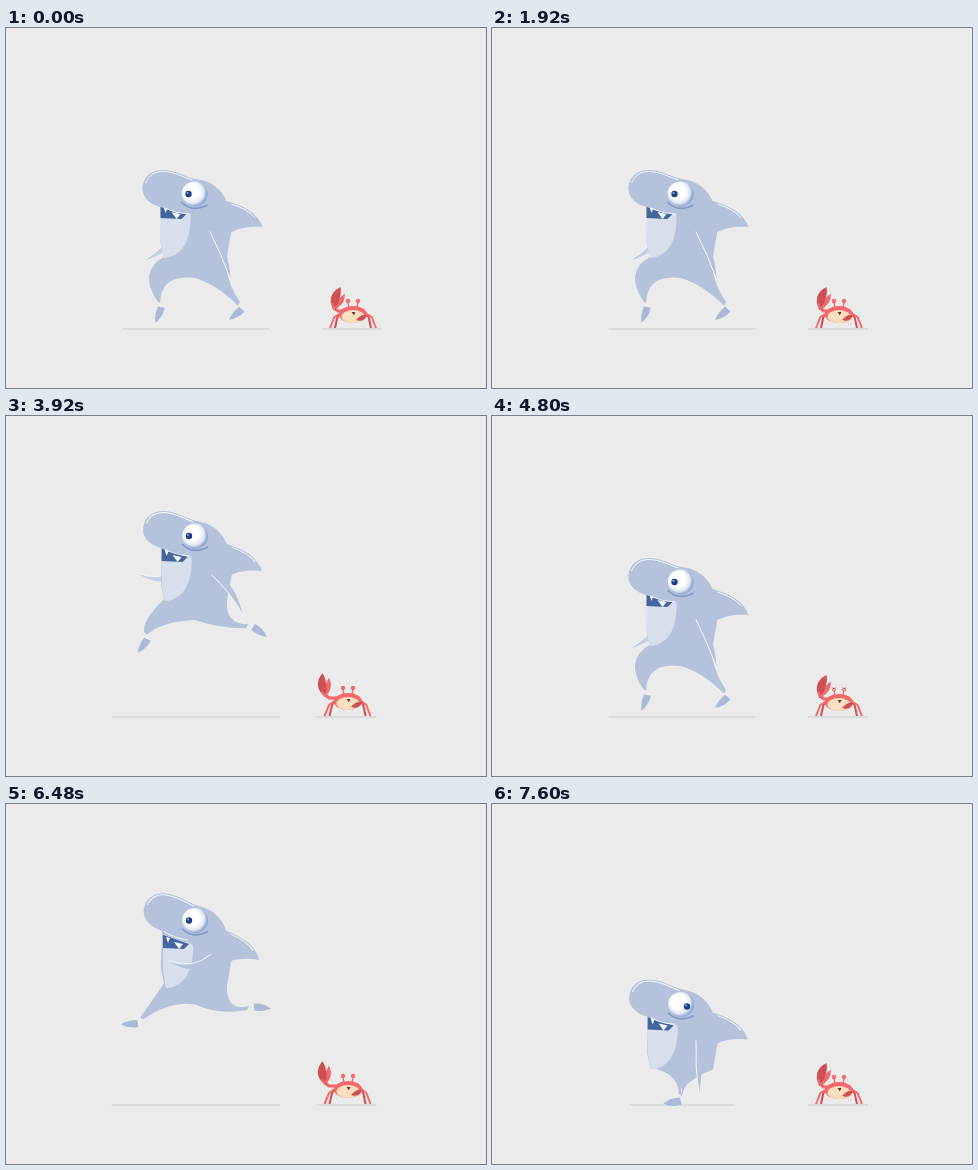
Write an HTML page with a canvas that moves like this. It is 480 px wide and 360 px high and loops after 7.68 s.

```html
<!DOCTYPE html>
<html lang="en">
<head>
<meta charset="utf-8">
<title>Shark and crab</title>
<style>
html, body { margin: 0; width: 100%; height: 100%; overflow: hidden; background: #ebebeb; }
canvas { display: block; }
</style>
</head>
<body>
<canvas id="stage" width="480" height="360"></canvas>
<script>
const ctx = document.getElementById('stage').getContext('2d');
const BLUE = '#b4c2dc', PALE = '#d7dfed', WHITE = '#f5f8fd', NAVY = '#45659f';
const RED = '#f3696b', DARK_RED = '#cf5052', CREAM = '#f9dfc0';
const LOOP = 7680, STEP = 80, GROUND = 301;

const lerp = (a, b, k) => a + (b - a) * k;
const mix = (a, b, k) => a.map((v, i) => lerp(v, b[i], k));
const polar = ([x, y], len, angle) => [x + len * Math.sin(angle), y + len * Math.cos(angle)];

// Pose at time t from [time, numbers] keys
function tween(keys, t, ease = k => k) {
  const next = keys.findIndex(key => key[0] > t);
  if (next < 0) return keys[keys.length - 1][1];
  const [t0, a] = keys[next - 1], [t1, b] = keys[next];
  return mix(a, b, ease((t - t0) / (t1 - t0)));
}

function shape(d, color) {
  ctx.fillStyle = color;
  ctx.fill(new Path2D(d));
}
function curve(d, color, width = 1) {
  ctx.strokeStyle = color;
  ctx.lineWidth = width;
  ctx.stroke(new Path2D(d));
}
function oval(color, x, y, rx, ry = rx) {
  ctx.beginPath();
  ctx.ellipse(x, y, rx, ry, 0, 0, 7);
  ctx.fillStyle = color;
  ctx.fill();
}
function within(x, y, angle, draw) {
  ctx.save();
  ctx.translate(x, y);
  ctx.rotate(angle);
  draw();
  ctx.restore();
}
const ground = (x0, x1) => curve(`M${x0},${GROUND}H${x1}`, '#c9ccd3', 1.1);

// Stride keys, in steps: eye x, y, head tilt, pupil shift,
// then heel x, y, toe angle and knee x, y for the front and the back leg
const stride = [
  [0, [188.5, 166, 0, -6, 155.5, 279, 1.95, 132, 244, 236, 281, 2.45, 219, 252]],
  [1, [189, 120, .03, -6, 141.5, 223, 2.2, 135, 206, 247, 211, .63, 219, 208]],
  [3, [189, 116.5, .1, -6, 132, 219.5, 3.1, 148, 194, 248, 203, .1, 220, 208]],
  [5, [189, 200.5, .03, 6, 188, 297, 3, 187, 269, 189, 297, 3, 192, 277]]
];

function foot(x, y, angle) {
  within(x, y, angle, () => {
    shape('M-1,-3.5Q10,-5 17,0Q9,4 0,3.5Z', '#a9b9d7');
    curve('M-1,-3.5L0,3.5', WHITE);
  });
}

function torso(x, y, front, frontKnee, back, backKnee) {
  const crotch = [x, y + 84];
  const ankle = (heel, knee) =>
    mix(heel, knee, 6 / Math.hypot(knee[0] - heel[0], knee[1] - heel[1]));
  const [fx, fy] = ankle(front, frontKnee), [bx, by] = ankle(back, backKnee);
  const [ix, iy] = mix(backKnee, crotch, .25);
  shape(`M${x - 33},${y + 10}L${x - 34},${y + 48}L${x - 31},${y + 63}
    Q${frontKnee} ${fx - 1},${fy - 1}L${fx + 2},${fy + 1}
    Q${mix(frontKnee, crotch, .4)} ${crotch}
    Q${ix},${iy + 5} ${bx - 1},${by + 2}L${bx + 1},${by - 2}
    Q${backKnee} ${x + 32},${y + 65}L${x + 37},${y + 37}L${x},${y}Z`, BLUE);
}

function face() {
  shape('M-34,12L-4,20C-3,46 -12,63 -31,64L-34,48Z', PALE);
  shape('M-34,11L-8,20L-13,25L-34,24Z', NAVY);
  shape('M-31,13L-27,14L-29,19ZM-23,18L-14,20L-18,25Z', WHITE);
}

function head() {
  shape(`M-34,13C-46,10 -53,2 -52,-7C-51,-18 -42,-24 -32,-24C-18,-24 -8,-16 4,-14.5
    C16,-13 27,-5 32,7C50,12 63,19 68,33C58,32 46,33 37,38L10,36L-4,20
    C-14,20 -24,17 -34,13Z`, BLUE);
  curve('M-49,-11C-46,-19 -39,-22.5 -32,-22.5C-20,-22.5 -12,-17 -2,-14', WHITE);
  curve('M37,10Q53,15 61,24', WHITE);
  curve('M-30,14Q-18,20 -5,20', WHITE);
}

function eye(look) {
  curve('M-13,8Q-3,19 13,11', '#8298c5', 1.6);
  const shade = ctx.createRadialGradient(-4, -4, 4, -1, -1, 14);
  shade.addColorStop(.35, '#fff');
  shade.addColorStop(.7, '#e3eaf4');
  shade.addColorStop(1, '#8299c9');
  oval(shade, 0, 0, 13, 12.5);
  oval('#1f3f80', look, look / 6 + 1, 3.2);
  oval('#8fb0e4', look - 1, look / 6, 1);
}

// swing runs from -1 (forward) to 1 (back); the elbow always folds forward
function arm(shoulder, swing, color) {
  const upper = swing, lower = upper - Math.abs(swing) + .4 * swing;
  const elbow = polar(shoulder, 27, upper), hand = polar(elbow, 27, lower);
  const side = (p, d, angle) => polar(p, d, angle - Math.PI / 2);
  const edge = `M${side(shoulder, 3, upper)}Q${side(elbow, 4, (upper + lower) / 2)} ${hand}`;
  shape(`${edge}Q${side(elbow, -4, (upper + lower) / 2)} ${side(shoulder, -4, upper)}Z`, color);
  curve(edge, WHITE);
}

function shark(step) {
  const [x, y, tilt, look, fx, fy, fa, fkx, fky, bx, by, ba, bkx, bky] = tween(stride, step % 6);
  const swing = Math.cos((step - 2) * Math.PI / 6);
  const reach = 84.5 - ((y - 116) / 15) ** 2;
  ground(190 - reach, 190 + reach);
  if (swing > .3) arm([x - 13, y + 33], -swing, '#c3cfe4');
  foot(fx, fy, fa);
  foot(bx, by, ba);
  torso(x, y, [fx, fy], [fkx, fky], [bx, by], [bkx, bky]);
  within(x + tilt * 20, y + tilt * 35, 0, face);
  within(x, y, tilt, head);
  within(x, y, 0, () => eye(look));
  arm([x + 18, y + 36], swing, BLUE);
}

// ground start, body x, y, claw x, y, claw angle
const rest = [316, 347, 287, 328, 280, .3];
const grab = [308, 337, 286.5, 311, 277, -1.25];
const raise = [310.5, 342, 286, 319, 279, -.12];
const crabKeys = [[0, rest], [560, rest], [880, grab], [1040, grab],
  [1280, raise], [1600, raise], [1920, rest], [2560, rest]];

function claw() {
  shape('M0,2C6,-3 9,-9 6,-17Q3,-11 -1,-8Z', RED);
  shape('M2,2C-8,-3 -8,-15 0,-22C4,-15 2,-9 2,2Z', DARK_RED);
  curve('M-3,-4L0,1L3,-4', RED, 2.2);
}

function crab(t) {
  const [x0, x, y, cx, cy, angle] = tween(crabKeys, t, k => k * k * (3 - 2 * k));
  const looking = Math.abs(t - 680) < 440 || Math.abs(t - 2240) < 160;
  ground(x0, x0 + 60);
  for (const side of [-1, 1]) {
    for (const spread of [18, 23]) {
      const hip = x + side * 12, toe = x0 + 31 + side * spread;
      curve(`M${hip},${y - 2}L${lerp(hip, toe, .6)},289L${toe},300`,
        spread === 18 ? DARK_RED : RED, 2);
    }
  }
  curve(`M${x - 10},${y - 4}L${cx + 4},${y - 4}L${cx},${cy}`, RED, 3.2);
  oval(RED, x, y - .5, 14, 8.5);
  oval(CREAM, x, y + 1.5, 11.5, 6.5);
  for (const side of [-1, 1]) {
    const ex = x + side * 5;
    curve(`M${x + side * 4},${y - 7}L${ex},${y - 13}`, RED, 1.4);
    oval(RED, ex, y - 14, 2.2);
    if (looking) {
      oval('#fff', ex, y - 14.5, 1.4);
      oval('#5a2d35', ex, y - 14.5, .8);
    }
  }
  within(x, y, 0, () => {
    shape('M-1.5,-3H2.5L.8,.2Z', '#6f3638');
    shape('M14,0Q8,-1 3,5Q10,8 14,0Z', DARK_RED);
  });
  within(cx, cy, angle, claw);
}

ctx.lineJoin = 'round';
const start = performance.now();
function tick() {
  const step = Math.floor((performance.now() - start) % LOOP / STEP);
  ctx.fillStyle = '#ebebeb';
  ctx.fillRect(0, 0, 480, 360);
  shark(step);
  crab(step * STEP % 2560);
  requestAnimationFrame(tick);
}
tick();
</script>
</body>
</html>
```
